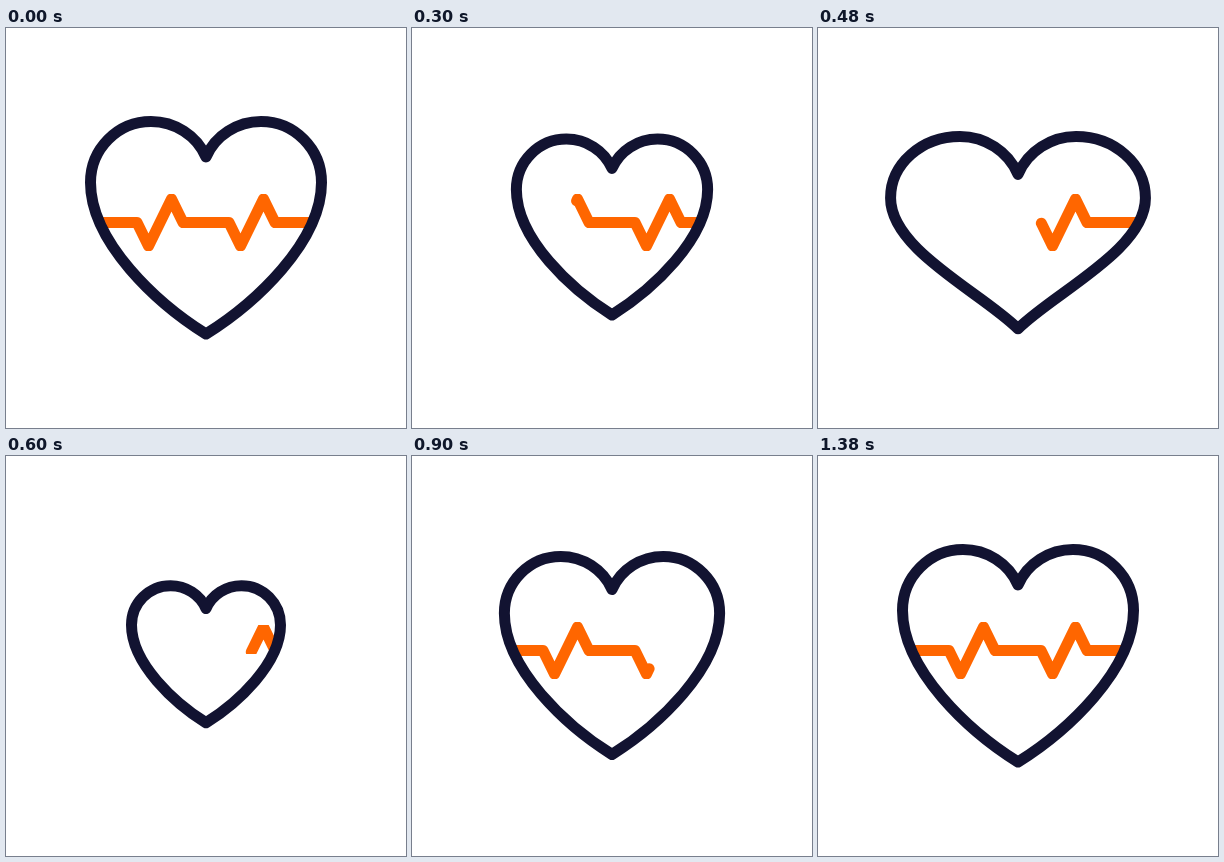
An HTML page that plays this animation: 400 by 400 pixels, repeating every 1.71 s.

```html
<!DOCTYPE html>
<html lang="en">
<head>
<meta charset="utf-8">
<title>Heartbeat</title>
<style>
  html, body { margin: 0; width: 100%; height: 100%; overflow: hidden; background: #fff; }
  svg { display: block; width: 100%; height: 100%; }
  path { fill: none; stroke-width: 11; stroke-linecap: round; stroke-linejoin: round; }
  .pulse { stroke: #ff6600; }
  #heart { stroke: #121331; }
  #inside { fill: #fff; }
</style>
</head>
<body>
<svg viewBox="0 0 400 400">
  <mask id="clip"><path id="inside"/></mask>
  <path id="leaving" class="pulse" mask="url(#clip)"/>
  <path id="entering" class="pulse" mask="url(#clip)"/>
  <path id="heart"/>
</svg>
<script>
const FRAME = 30, LOOP = 1710, BEAT = 10, SETTLE = 2 * BEAT, END = 46;
const CX = 200, CY = 195.5;

// Measured from the centre; taper sets how the sides run into the tip
const RELAXED = { width: 115.5, lobe: 55, top: -102, side: -41, notch: -66.5, tip: 110.5, taperX: 0.42, taperY: 0.2 };
const SQUASHED = { width: 123, lobe: 56, top: -84, side: -24.6, notch: -47.4, tip: 101.6, taperX: 0.29, taperY: 0.28 };

const $ = id => document.getElementById(id);
const mix = (a, b, t) => a + (b - a) * t;
const clamp = t => Math.min(1, Math.max(0, t));
const inOut = t => (1 - Math.cos(Math.PI * t)) / 2;
const out = (t, power) => 1 - (1 - t) ** power;
const dist = (a, b) => Math.hypot(b[0] - a[0], b[1] - a[1]);

function pulseLine() {
  const y = 194.5, swing = 23.5, step = 11.5;
  const points = [[82.5, y]];
  for (const x of [131, 223]) {
    points.push([x, y], [x + step, y + swing], [x + 3 * step, y - swing], [x + 4 * step, y]);
  }
  return [...points, [317.5, y]];
}

const LINE = pulseLine();
const LENGTH = LINE.slice(1).reduce((sum, p, i) => sum + dist(LINE[i], p), 0);

function scaleAt(f) {
  if (f <= 10) return mix(1, 0.828, out(f / 10, 3));
  if (f <= 16) return mix(0.828, 1.036, inOut((f - 10) / 6));
  if (f <= SETTLE) return mix(1.036, 0.645, inOut((f - 16) / 4));
  return mix(0.645, 1, out((f - SETTLE) / (END - SETTLE), 3.4));
}

function squashAt(f) {
  if (f >= SETTLE) return 0;
  const beat = f % BEAT;
  return beat < 6 ? beat / 6 : 1 - inOut((beat - 6) / 4);
}

// One half runs from the notch over the lobe and down to the tip
function heartPath(scale, squash) {
  const s = {};
  for (const key in RELAXED) s[key] = mix(RELAXED[key], SQUASHED[key], squash);
  const round = 0.5523, drop = s.tip - s.side;
  const outline = [
    [0, s.notch],
    [0.17 * s.lobe, mix(s.notch, s.top, 0.61)], [0.57 * s.lobe, s.top], [s.lobe, s.top],
    [mix(s.lobe, s.width, round), s.top], [s.width, mix(s.side, s.top, round)], [s.width, s.side],
    [s.width, s.side + 0.395 * drop], [s.taperX * s.width, s.tip - s.taperY * drop], [0, s.tip]
  ];
  const half = sign => outline.map(([x, y]) => [CX + sign * scale * x, CY + scale * y]);
  const left = half(-1), right = half(1).reverse();
  return `M${left[0]}C${left.slice(1).join(' ')}C${right.slice(1).join(' ')}Z`;
}

function trimmedLine(from, to) {
  const points = [];
  let walked = 0;
  for (let i = 1; i < LINE.length; i++) {
    const a = LINE[i - 1], b = LINE[i], step = dist(a, b);
    const t0 = clamp((from - walked) / step), t1 = clamp((to - walked) / step);
    if (t1 > t0) {
      const at = t => [mix(a[0], b[0], t), mix(a[1], b[1], t)];
      if (!points.length) points.push(at(t0));
      points.push(at(t1));
    }
    walked += step;
  }
  return points.length ? 'M' + points.join('L') : '';
}

function draw(f) {
  const outline = heartPath(scaleAt(f), squashAt(f));
  const drawn = out(clamp((f - SETTLE) / (END - SETTLE)), 2.2);
  $('heart').setAttribute('d', outline);
  $('inside').setAttribute('d', outline);
  $('leaving').setAttribute('d', trimmedLine(LENGTH * f / 28.2, LENGTH));
  $('entering').setAttribute('d', trimmedLine(0, LENGTH * drawn));
}

const origin = performance.now();
function tick() {
  const time = (performance.now() - origin) % LOOP;
  draw(Math.min(END, Math.floor(time / FRAME)));
  requestAnimationFrame(tick);
}
tick();
</script>
</body>
</html>
```
